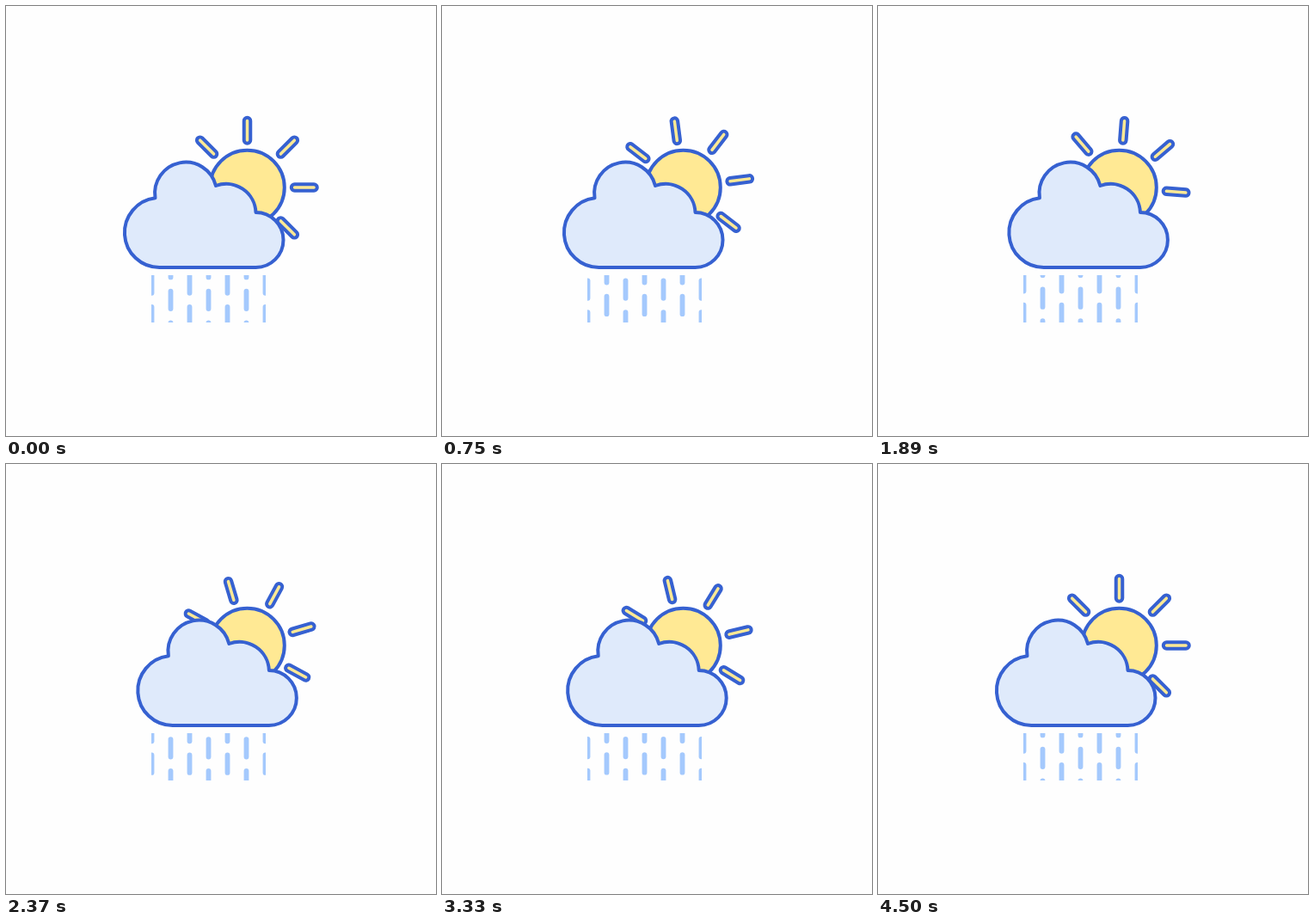
An HTML page that plays this animation: 500x500 px, repeating every 4530 ms.

```html
<!DOCTYPE html>
<html lang="en">
<head>
<meta charset="utf-8">
<title>Sun, cloud and rain</title>
<style>
  html, body { margin: 0; width: 100%; height: 100%; overflow: hidden; background: #fefefe; }
  svg { display: block; width: 100vw; height: 100vh; }
  .line { stroke: #3661d1; stroke-width: 4; stroke-linejoin: round; }
  .sun { fill: #ffe994; }
  .cloud { fill: #dfeafb; }
  .rain { stroke: #a4c9fd; stroke-width: 5.8; stroke-linecap: round; }
</style>
</head>
<body>
<svg viewBox="0 0 500 500">
  <clipPath id="window"><rect x="169" y="313" width="133" height="55"/></clipPath>
  <g clip-path="url(#window)"><g id="rain" class="rain"></g></g>
  <g class="sun line">
    <g id="rays"></g>
    <circle cx="280.5" cy="211" r="43.3"/>
  </g>
  <path id="cloud" class="cloud line" d="M178.5 304A40.5 40.5 0 0 1 173.5 223.3A36 36 0 0 1 244 209A34.5 34.5 0 0 1 290.5 240A32 32 0 0 1 290.5 304Z"/>
</svg>
<script>
  const LOOP = 4530, CYCLE = 4500, STEP = 30;
  const SUN = '280.5 211';
  const DRIFT = 15.5, TURN = 225;
  const PITCH = 36.7, DASH = 20.5, FALLS = 7;

  const [rain, rays, cloud] = ['rain', 'rays', 'cloud'].map(id => document.getElementById(id));

  function add(parent, tag, attrs) {
    const el = document.createElementNS('http://www.w3.org/2000/svg', tag);
    for (const key in attrs) el.setAttribute(key, attrs[key]);
    parent.append(el);
  }

  for (let i = 0; i < 8; i++) {
    add(rays, 'rect', {
      x: 276.75, y: 129.7, width: 7.5, height: 30, rx: 3.75,
      transform: `rotate(${i * 45} ${SUN})`
    });
  }

  // Neighbouring columns are half a pitch apart.
  for (let col = 0; col < 7; col++) {
    const x = 169.5 + col * 22;
    const top = 331.6 + (col % 2 ? 0 : PITCH / 2);
    for (let k = -3; k < 2; k++) {
      const y = top + k * PITCH;
      add(rain, 'line', { x1: x, x2: x, y1: y, y2: y + DASH });
    }
  }

  const ease = s => s * s * (3 - 2 * s);

  function draw() {
    const t = Math.floor((performance.now() % LOOP) / STEP) * STEP;
    const u = t / CYCLE;
    const swing = ease(1 - Math.abs(2 * u - 1));
    rays.setAttribute('transform', `rotate(${TURN * u} ${SUN})`);
    cloud.setAttribute('transform', `translate(${DRIFT * swing} 0)`);
    rain.setAttribute('transform', `translate(0 ${(u * FALLS % 1) * PITCH})`);
    requestAnimationFrame(draw);
  }
  draw();
</script>
</body>
</html>
```
